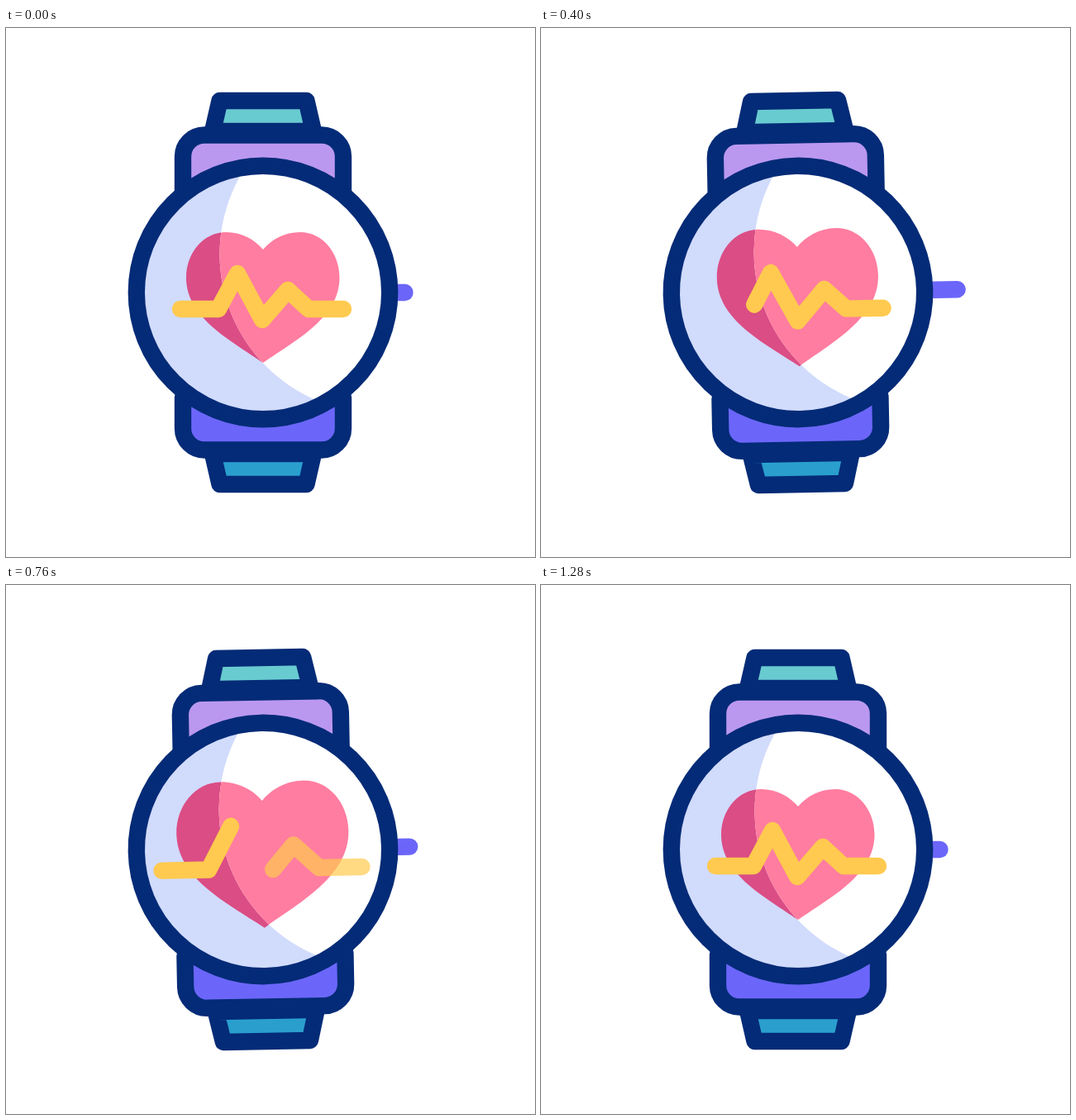
An HTML page with a canvas that plays this animation: 640 by 640 pixels, repeating every 1880 ms.

```html
<!DOCTYPE html>
<html lang="en">
<head>
<meta charset="utf-8">
<title>Heart rate watch</title>
<style>
  html, body { margin: 0; width: 100%; height: 100%; overflow: hidden; background: #fff; }
  canvas { display: block; width: 100vmin; height: 100vmin; }
</style>
</head>
<body>
<canvas id="stage" width="640" height="640"></canvas>
<script>
const ctx = document.getElementById('stage').getContext('2d');

const LOOP = 1880, STEP = 40, LAST_STEP = 1280;
const CX = 311, CY = 320, HEART_Y = 325.5, LINE = 20.4;
const NAVY = '#042b77', TEAL = '#68cbd0', BLUE = '#2a9fce', LILAC = '#bb98f0',
      VIOLET = '#6b66f9', SHADE = '#d1dbfc', PINK = '#ff7da0', ROSE = '#db4d85',
      YELLOW = '#ffca4f';

// Keys are [time, value] pairs
const TILT = [[0, 0], [320, -6.8], [480, 4.6], [800, -1.35], [1120, 0]];
const CROWN = [[80, 0], [440, 22], [520, 22], [880, 0]];
const HEART_SCALE = [[280, 1], [600, 1.165], [1080, 1]];
const PULSE_SCALE = [[280, 1], [680, 1.25], [1120, 1]];

const PULSE = [[211, 340], [257, 340], [280, 297], [310, 353], [341, 317], [366, 340], [408, 340]];
const PULSE_LENGTH = PULSE.slice(1).reduce(
  (sum, [x, y], i) => sum + Math.hypot(x - PULSE[i][0], y - PULSE[i][1]), 0);

const smooth = u => u * u * (3 - 2 * u);
const progress = (t, from, to) => Math.min(1, Math.max(0, (t - from) / (to - from)));

function track(keys, t) {
  let value = keys[0][1];
  for (let i = 1; i < keys.length; i++) {
    const [t0, v0] = keys[i - 1], [t1, v1] = keys[i];
    if (t >= t0) value = v0 + (v1 - v0) * smooth(progress(t, t0, t1));
  }
  return value;
}

// Cubic easing with a soft start and a long soft end
function easeDraw(x) {
  let lo = 0, hi = 1;
  const bezier = (s, a, b) => 3 * (1 - s) * (1 - s) * s * a + 3 * (1 - s) * s * s * b + s * s * s;
  for (let i = 0; i < 24; i++) {
    const mid = (lo + hi) / 2;
    if (bezier(mid, 0.25, 0.4) < x) lo = mid; else hi = mid;
  }
  return bezier(hi, 0, 1);
}

function paint(path, fill, stroke) {
  if (fill) { ctx.fillStyle = fill; ctx.fill(path); }
  if (stroke) { ctx.strokeStyle = stroke; ctx.stroke(path); }
}

function circle(x, y, r) {
  const path = new Path2D();
  path.arc(x, y, r, 0, Math.PI * 2);
  return path;
}

const topStrap = new Path2D('M250 125 L258.5 88 H363.5 L372 125 Z');
const bottomStrap = new Path2D('M250 515 L258.5 552 H363.5 L372 515 Z');
const topCase = new Path2D('M214 240 V155.5 A26 26 0 0 1 240 129.5 H382 A26 26 0 0 1 408 155.5 V240');
const bottomCase = new Path2D('M214 447 V484.5 A26 26 0 0 0 240 510.5 H382 A26 26 0 0 0 408 484.5 V447');
const bottomFill = new Path2D('M214 400 V484.5 A26 26 0 0 0 240 510.5 H382 A26 26 0 0 0 408 484.5 V400 Z');
const heart = new Path2D('M311 268 C301 256 285 247 266 247 C239 247 218 272 218 302 ' +
  'C218 350 270 377 311 405 C352 377 403.5 350 403.5 302 C403.5 272 383 247 356 247 C337 247 321 256 311 268 Z');
const dial = circle(CX, CY, 153.2);
const lightArea = circle(450.5, 273.5, 192);

function drawDial(background, heartColor, scale) {
  paint(dial, background);
  ctx.save();
  ctx.translate(CX, HEART_Y);
  ctx.scale(scale, scale);
  ctx.translate(-CX, -HEART_Y);
  paint(heart, heartColor);
  ctx.restore();
}

// Strokes the part of the pulse line between two lengths
function drawPulse(from, to, scale, alpha) {
  if (to - from < 0.01 || alpha <= 0) return;
  const path = new Path2D();
  for (const [x, y] of PULSE) path.lineTo(CX + (x - CX) * scale, HEART_Y + (y - HEART_Y) * scale);
  ctx.save();
  ctx.globalAlpha = alpha;
  ctx.setLineDash([(to - from) * scale, 2000]);
  ctx.lineDashOffset = -from * scale;
  paint(path, null, YELLOW);
  ctx.restore();
}

function draw(t) {
  ctx.fillStyle = '#fff';
  ctx.fillRect(0, 0, 640, 640);
  ctx.save();
  ctx.lineWidth = LINE;
  ctx.lineCap = ctx.lineJoin = 'round';
  ctx.translate(CX, CY);
  ctx.rotate(track(TILT, t) * Math.PI / 180);
  ctx.translate(-CX, -CY);

  paint(topStrap, TEAL, NAVY);
  paint(bottomStrap, BLUE, NAVY);
  paint(topCase, LILAC, NAVY);
  paint(bottomFill, VIOLET);
  paint(bottomCase, null, NAVY);

  const crown = new Path2D();
  crown.moveTo(440, CY);
  crown.lineTo(482.5 + track(CROWN, t), CY);
  paint(crown, null, VIOLET);

  const heartScale = track(HEART_SCALE, t);
  drawDial(SHADE, ROSE, heartScale);
  ctx.save();
  ctx.clip(lightArea);
  drawDial('#fff', PINK, heartScale);
  ctx.restore();

  const pulseScale = track(PULSE_SCALE, t);
  const erased = PULSE_LENGTH * progress(t, 240, 1080);
  const drawn = PULSE_LENGTH * easeDraw(progress(t, 560, 1280));
  drawPulse(erased, PULSE_LENGTH, pulseScale, 1 - progress(t, 680, 950));
  if (t > 560) drawPulse(0, drawn, pulseScale, 1);

  paint(dial, null, NAVY);
  ctx.restore();
}

const start = performance.now();
function tick() {
  const t = (performance.now() - start) % LOOP;
  draw(Math.min(LAST_STEP, Math.floor(t / STEP) * STEP));
  requestAnimationFrame(tick);
}
tick();
</script>
</body>
</html>
```
